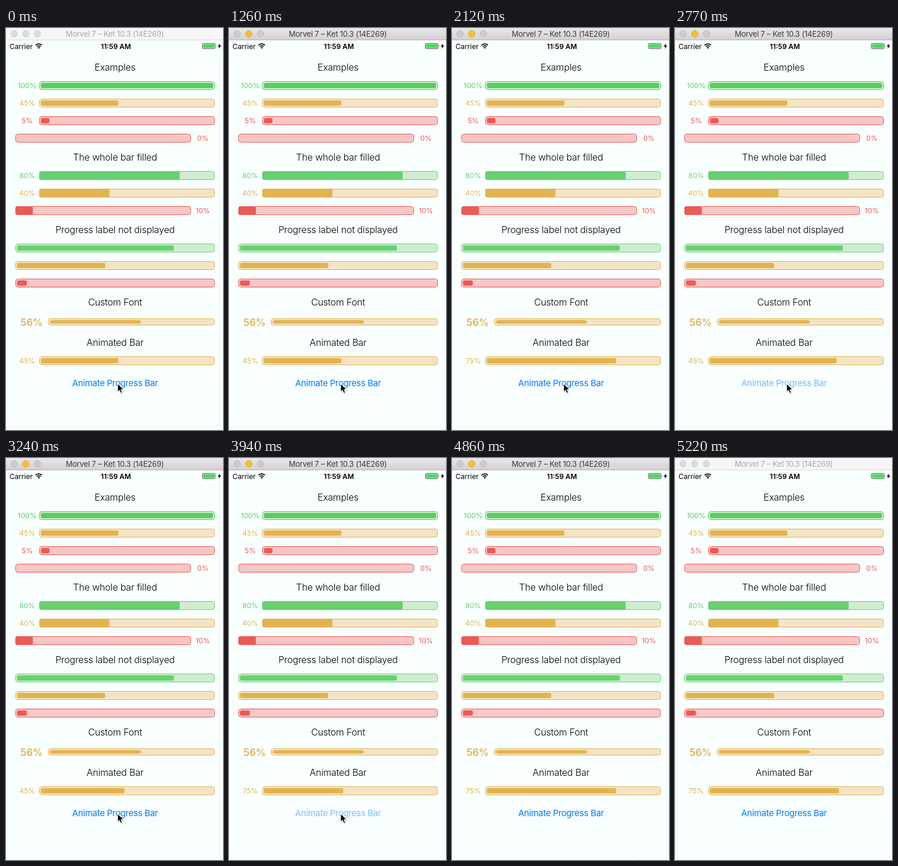
An HTML page for the animation above (5.28 s loop, 373 px wide and 688 px high).

```html
<!DOCTYPE html>
<html lang="en">
<head>
<meta charset="utf-8">
<title>Progress bars</title>
<style>
html, body { margin: 0; width: 100%; height: 100%; overflow: hidden; background: #f9ffff; }
svg { display: block; width: 373px; height: 688px; }
text { font-family: Inter, Roboto, sans-serif; text-anchor: middle; }
.head { font: 300 16px Roboto, "Liberation Sans", sans-serif; letter-spacing: -.15px; }
.label { font-size: 12.1px; }
.title { font-size: 13px; letter-spacing: -.2px; }
.status { font-size: 12.2px; }

/* One loop is 5280 ms; 1% = 52.8 ms */
.active, .fill, .low, .high, .button, .pointer { animation: 5.28s linear infinite; }
.active { animation-name: focus; }
.fill { animation-name: fill; }
.low { animation-name: low; }
.high { animation-name: high; }
.button { animation-name: press; font-size: 15px; letter-spacing: -.3px; }
.pointer { animation-name: move; }

@keyframes focus {
  0% { opacity: 0; animation-timing-function: step-end; }
  23.86% { opacity: 1; animation-timing-function: step-end; }
  98.86%, 100% { opacity: 0; }
}
@keyframes fill {
  0% { width: 133.2px; }
  25.53% { width: 133.2px; animation-timing-function: ease-in-out; }
  40.114% { width: 222px; }
  50.284% { width: 222px; animation-timing-function: ease-in-out; }
  64.867% { width: 133.2px; }
  72.689% { width: 133.2px; animation-timing-function: ease-in-out; }
  87.273%, 100% { width: 222px; }
}
@keyframes low {
  0%, 50.284% { opacity: 1; animation-timing-function: step-end; }
  25.53%, 72.689% { opacity: 0; animation-timing-function: step-end; }
  100% { opacity: 0; }
}
@keyframes high {
  0%, 50.284% { opacity: 0; animation-timing-function: step-end; }
  25.53%, 72.689% { opacity: 1; animation-timing-function: step-end; }
  100% { opacity: 1; }
}
@keyframes press {
  0%, 33.674%, 58.428%, 80.833% { opacity: 1; animation-timing-function: step-end; }
  48.106%, 71.402% { opacity: .2; animation-timing-function: step-end; }
  25.53%, 50.284%, 72.689% { opacity: .2; animation-timing-function: ease-out; }
  100% { opacity: 1; }
}
@keyframes move {
  0%, 81.44% { transform: translate(192px, 609px); }
  83.333% { transform: translate(226px, 621px); }
  92.045% { transform: translate(322px, 686px); }
  93.182%, 100% { transform: translate(327px, 700px); }
}
</style>
</head>
<body>
<svg viewBox="0 0 373 688">
  <defs>
    <linearGradient id="chrome" x2="0" y2="1">
      <stop stop-color="#e9e7e9"/><stop offset="1" stop-color="#d2d0d2"/>
    </linearGradient>
  </defs>
  <rect width="373" height="688" fill="#f9ffff"/>

  <g>
    <rect width="373" height="21" fill="#f6f6f6"/>
    <rect y="20" width="373" height="1" fill="#d9d9d9"/>
    <g fill="#dcdcdc" stroke="#d0d0d0">
      <circle cx="14" cy="10" r="5.5"/><circle cx="34" cy="10" r="5.5"/><circle cx="54" cy="10" r="5.5"/>
    </g>
    <text class="title" x="187" y="15" fill="#a8a8a8">Morvel 7 – Ket 10.3 (14E269)</text>
  </g>
  <g class="active">
    <rect width="373" height="21" fill="url(#chrome)"/>
    <rect y="20" width="373" height="1" fill="#b5b3b5"/>
    <g fill="#cdcbcd" stroke="#bab8ba">
      <circle cx="14" cy="10" r="5.5"/><circle cx="54" cy="10" r="5.5"/>
      <circle cx="34" cy="10" r="5.5" fill="#fdbe2e" stroke="#e0a225"/>
    </g>
    <text class="title" x="187" y="15" fill="#3c3c3c">Morvel 7 – Ket 10.3 (14E269)</text>
  </g>

  <text class="status" x="26" y="35.5">Carrier</text>
  <g fill="none" stroke="#000" stroke-width="1.7">
    <path d="M50.8 29.4a7.7 7.7 0 0 1 11 0M52.9 31.7a4.8 4.8 0 0 1 6.8 0"/>
    <path d="M56.3 35.6l-2-2.1a2.9 2.9 0 0 1 4 0z" fill="#000" stroke="none"/>
  </g>
  <text class="status" x="189" y="35.5" font-weight="600" style="font-size:12px">11:59 AM</text>
  <rect x="337.5" y="26.5" width="22" height="9" rx="1.5" fill="none" stroke="#6c716f"/>
  <rect x="338.5" y="27.5" width="20" height="7" rx=".5" fill="#4cd964"/>
  <path d="M361 29.5q1.6 1.5 0 3z" fill="#555"/>
  <path d="M368.3 26.5l-4.6 5h2.8l-1.2 4 4.8-5.2h-2.9z"/>

  <g class="head">
    <text x="187.5" y="73">Examples</text>
    <text x="187.5" y="227">The whole bar filled</text>
    <text x="187.5" y="351">Progress label not displayed</text>
    <text x="187.5" y="475">Custom Font</text>
    <text x="187.5" y="544">Animated Bar</text>
  </g>

  <g id="bars"></g>
  <g class="label" fill="#e3b34f">
    <text class="low" x="36.5" y="574">45%</text>
    <text class="high" x="36.5" y="574">75%</text>
  </g>
  <text x="44" y="509.5" fill="#e3b34f" font-weight="600" font-size="17">56%</text>

  <text class="button" x="187.5" y="612.5" fill="#007aff">Animate Progress Bar</text>
  <g class="pointer">
    <path d="M1 2v13.5l3-2.8 2.1 5 2.8-1.1-2.1-4.9h4.3z" fill="#000" opacity=".2"/>
    <path d="M0 0v13.6l3.1-2.9 2.1 5 2.5-1-2.1-4.9h4.2z" stroke="#fff" stroke-width=".9"/>
  </g>
</svg>
<script>
const tints = {
  lime: ['#57cf5b', '#ceeecf'],
  green: ['#68d071', '#ceeecf'],
  gold: ['#e3b34f', '#f4e4c7'],
  red: ['#ec5a54', '#f6c7c7'],
};
const group = document.getElementById('bars');

function add(tag, attrs, text = '') {
  const el = document.createElementNS('http://www.w3.org/2000/svg', tag);
  for (const key in attrs) el.setAttribute(key, attrs[key]);
  el.textContent = text;
  group.append(el);
}

// mid is the centre line, pad the gap between track and fill
function bar(mid, tint, percent, { left = 57, right = 359, pad = 3, height = 15, rx = 3, label, cls = '' } = {}) {
  const [color, back] = tints[tint];
  const top = mid - height / 2;
  add('rect', { x: left + .5, y: top + .5, width: right - left - 1, height: height - 1, rx: 4, fill: back, stroke: color });
  if (percent) add('rect', {
    x: left + pad, y: top + pad, width: (right - left - 2 * pad) * percent / 100,
    height: height - 2 * pad, rx, ry: Math.min(rx, 4), fill: color, class: cls,
  });
  if (label) add('text', { x: label, y: mid + 4.5, fill: color, class: 'label' }, percent + '%');
}

const before = { label: 36.5 };
const after = { left: 16, right: 318, label: 338.5 };
const whole = { pad: 0, rx: 4 };
const wide = { left: 16 };

bar(98.5, 'lime', 100, before);
bar(128.5, 'gold', 45, before);
bar(158.5, 'red', 5, before);
bar(188.5, 'red', 0, after);
bar(252.5, 'green', 80, { ...before, ...whole });
bar(282.5, 'gold', 40, { ...before, ...whole });
bar(312.5, 'red', 10, { ...after, ...whole });
bar(376.5, 'green', 80, wide);
bar(406.5, 'gold', 45, wide);
bar(436.5, 'red', 5, wide);
bar(503, 'gold', 56, { left: 72, height: 12, rx: 6 });
bar(569.5, 'gold', 45, { cls: 'fill' });
</script>
</body>
</html>
```
